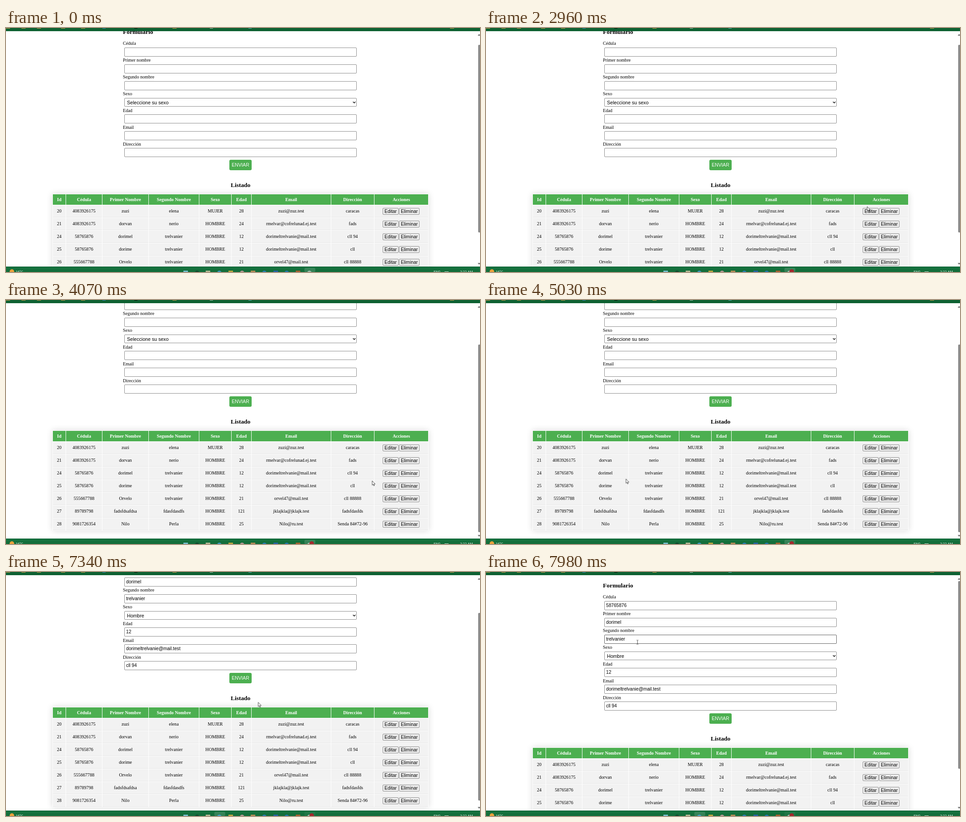
An HTML page for the animation above (8 s loop, 1042 by 537 pixels).

```html
<!DOCTYPE html>
<html lang="es">
<head>
<meta charset="utf-8">
<title>Formulario</title>
<style>
@property --scroll { syntax: "<number>"; inherits: true; initial-value: 21; }
html, body { margin: 0; width: 100%; height: 100%; overflow: hidden; background: #fff; }
#stage {
  position: absolute; inset: 0; overflow: hidden; color: #000;
  font: 10.15px/12px "Liberation Serif", "Times New Roman", serif;
  animation: scroll 8s step-end infinite;
}
#stage * { position: absolute; box-sizing: border-box; white-space: nowrap; }
#view { left: 0; top: 7px; width: 1037px; height: 518px; overflow: hidden; }
#page { left: 0; top: -7px; width: 1037px; height: 640px; transform: translateY(calc(var(--scroll) * -1px)); }
h3 { margin: 0; font-size: 13.45px; line-height: 16px; }
.field, .btn, #send { font-family: "Liberation Sans", Arial, sans-serif; }
.field { left: 260px; width: 511px; height: 20px; border: 1px solid #8e8e8e; border-radius: 2px; background: #fff; }
.field span { left: 3px; top: 3px; }
.select { height: 19px; font-size: 10.6px; }
.select span { left: 5px; }
.select svg { right: 1px; top: 6px; width: 7px; height: 6px; }
.filled { animation: filled 8s step-end infinite; }
.empty { animation: empty 8s step-end infinite; }
#send { left: 491px; top: 311px; width: 49px; height: 23px; border-radius: 3px; background: #4caf50; color: #fff; font-size: 10.3px; line-height: 23px; text-align: center; }
#table { left: 102px; top: 386px; width: 827px; height: 221px; background: #fff; box-shadow: 0 0 13px rgba(0,0,0,.15); }
.cell { height: 27px; line-height: 26px; text-align: center; background: #f2f2f2; border-bottom: 1px solid #e6e6e6; }
.head { height: 23px; line-height: 23px; background: #4caf50; color: #fff; font-weight: bold; border: 0; }
.btn { top: 6px; height: 15px; border: 1px solid #8e8e8e; border-radius: 2px; background: #efefef; font-size: 10.3px; line-height: 13px; }
.hover { animation: hover 8s step-end infinite; }
.hovered { animation: border 8s step-end infinite; }
#thumb { left: 1038px; top: calc(20px + var(--scroll) * .79px); width: 5px; height: 413px; border-radius: 2px; background: #8b8b8b; }
.arrow { left: 1037px; border: 3px solid transparent; }
.bar { left: 0; width: 100%; overflow: hidden; background: #0e6132; }
#top { top: 0; height: 7px; }
#bottom { top: 525px; height: 12px; background: linear-gradient(#0b5c30 0, #16733f 2px, #126b39); color: #fff; font: 7.5px/9px "Open Sans", sans-serif; }
#bottom span { top: 7px; }
.dot { border-radius: 50%; }
.lit { left: 458px; top: 3px; width: 24px; height: 9px; border-radius: 3px; background: rgba(255,255,255,.14); animation: active 8s step-end infinite; }
.lit.first { left: 656px; animation-name: first; }
#record { left: 667px; top: 6px; width: 10px; height: 10px; background: #a3262c; animation: record 8s step-end infinite; }
#cursor { left: 0; top: 0; animation: move 8s linear infinite; }
#cursor svg { overflow: visible; width: 8px; height: 13px; }
#pointer { animation: pointer 8s step-end infinite; }
#ibeam { animation: ibeam 8s step-end infinite; }

@keyframes scroll {
  0% { --scroll: 21; }
  37.9% { --scroll: 38; }
  38.75% { --scroll: 75; }
  39.6% { --scroll: 97; }
  40.5% { --scroll: 99; }
  91.7% { --scroll: 89; }
  92.6% { --scroll: 58; }
  93.5% { --scroll: 27; }
  94.4% { --scroll: 14; }
  95.3% { --scroll: 4; }
  96.1%, 100% { --scroll: 0; }
}
@keyframes filled { 0% { opacity: 0; } 85.6%, 100% { opacity: 1; } }
@keyframes empty { 0% { opacity: 1; } 85.6%, 100% { opacity: 0; } }
@keyframes hover { 0% { background: #efefef; } 82% { background: #e5e5e5; } 87%, 100% { background: #efefef; } }
@keyframes border { 0% { border-color: #8e8e8e; } 97%, 100% { border-color: #636363; } }
@keyframes active { 0% { opacity: 0; } 80%, 100% { opacity: 1; } }
@keyframes first { 0% { opacity: 1; } 80%, 100% { opacity: .35; } }
@keyframes record { 0% { opacity: 0; } 6%, 100% { opacity: 1; } }
@keyframes pointer { 0% { opacity: 1; } 95.3%, 100% { opacity: 0; } }
@keyframes ibeam { 0% { opacity: 0; } 95.3%, 100% { opacity: 1; } }
@keyframes move {
  0%, .8% { transform: translate(667px, 545px); }
  3.5% { transform: translate(770px, 420px); }
  6% { transform: translate(839px, 335px); }
  8.5% { transform: translate(812px, 303px); }
  10.2%, 12% { transform: translate(796px, 321px); }
  16.4%, 19.7% { transform: translate(791px, 303px); }
  23% { transform: translate(755px, 289px); }
  26.5% { transform: translate(645px, 302px); }
  29.4% { transform: translate(592px, 330px); }
  32.5% { transform: translate(660px, 352px); }
  35.2% { transform: translate(768px, 374px); }
  36.1% { transform: translate(829px, 387px); }
  37% { transform: translate(838px, 393px); }
  39.6%, 40.5% { transform: translate(836px, 392px); }
  47.4%, 50.9% { transform: translate(805px, 398px); }
  55% { transform: translate(600px, 385px); }
  60.4% { transform: translate(345px, 393px); }
  64% { transform: translate(291px, 394px); }
  70.5% { transform: translate(520px, 390px); }
  75.5% { transform: translate(711px, 392px); }
  79% { transform: translate(848px, 389px); }
  81% { transform: translate(853px, 388px); }
  83%, 86% { transform: translate(848px, 383px); }
  89% { transform: translate(700px, 330px); }
  91.75% { transform: translate(555px, 287px); }
  93.5% { transform: translate(470px, 235px); }
  96.1% { transform: translate(350px, 163px); }
  98%, 100% { transform: translate(333px, 154px); }
}
</style>
</head>
<body>
<div id="stage">
  <div id="view"><div id="page">
    <h3 style="left:257px;top:22px">Formulario</h3>
    <div id="send">ENVIAR</div>
    <h3 style="left:494px;top:359px">Listado</h3>
    <div id="table"></div>
  </div></div>
  <div id="thumb"></div>
  <div class="arrow" style="top:10px;border-bottom:4px solid #777"></div>
  <div class="arrow" style="top:517px;border-top:4px solid #777"></div>
  <div id="top" class="bar"></div>
  <div id="bottom" class="bar">
    <div class="lit first"></div><div class="lit"></div>
    <span style="left:21px">16°C</span>
    <span style="left:940px">ENG</span>
    <span style="left:998px">2:22 AM</span>
    <div id="record" class="dot"></div>
  </div>
  <div id="cursor">
    <svg id="pointer"><path d="M0 0V9.5L2.2 7.5L3.7 11L5 10.4L3.6 7.1H6.6Z" fill="#fff" stroke="#222" stroke-width=".8"/></svg>
    <svg id="ibeam"><path d="M-2 -4H-.5M.5 -4H2M0 -3.7V4.7M-2 5H-.5M.5 5H2" fill="none" stroke="#333" stroke-width=".9"/></svg>
  </div>
</div>
<script>
const $ = id => document.getElementById(id);

function add(parent, className, style, text = "") {
  const el = document.createElement("div");
  el.className = className;
  for (const [key, value] of Object.entries(style))
    el.style[key] = typeof value === "number" && key !== "opacity" ? value + "px" : value;
  el.textContent = text;
  parent.append(el);
  return el;
}

function addText(parent, className, text) {
  const span = document.createElement("span");
  span.className = className;
  span.textContent = text;
  parent.append(span);
}

const person = ["58765876", "dorimel", "trelvanier", "Hombre", "12", "dorimeltrelvanie@mail.test", "cll 94"];
const labels = ["Cédula", "Primer nombre", "Segundo nombre", "Sexo", "Edad", "Email", "Dirección"];
labels.forEach((label, i) => {
  const select = i === 3;
  const top = Math.round(63.7 + 36.9 * i) + (select ? 1 : 0);
  add($("page"), "", { left: 257, top: Math.round(49.2 + 36.9 * i) }, label);
  const field = add($("page"), "field" + (select ? " select" : i === 2 ? " hovered" : ""), { top });
  if (select) {
    addText(field, "empty", "Seleccione su sexo");
    field.insertAdjacentHTML("beforeend",
      '<svg viewBox="0 0 7 6"><path d="M.8 1.2L3.5 4L6.2 1.2" fill="none" stroke="#111" stroke-width="1.4"/></svg>');
  }
  addText(field, "filled", person[i]);
});

const edges = [102.5, 131.5, 211.5, 313.5, 424.5, 495.5, 539.5, 714.5, 809.5, 928.5];
const heads = ["Id", "Cédula", "Primer Nombre", "Segundo Nombre", "Sexo", "Edad", "Email", "Dirección", "Acciones"];
const rows = [
  ["20", "4083926175", "zuzi", "elena", "MUJER", "28", "zuzi@zuz.test", "caracas"],
  ["21", "4083926175", "dorvan", "nerio", "HOMBRE", "24", "rmelvar@cofrelunad.ej.test", "fads"],
  ["24", "58765876", "dorimel", "trelvanier", "HOMBRE", "12", person[5], "cll 94"],
  ["25", "58765876", "dorime", "trelvanier", "HOMBRE", "12", person[5], "cll"],
  ["26", "555667788", "Orvelo", "trelvanier", "HOMBRE", "21", "orvel47@mail.test", "cll 88888"],
  ["27", "89789798", "fadsfdsafdsa", "fdasfdasdfs", "HOMBRE", "121", "jklajkla@jklajk.test", "fadsfdasfds"],
  ["28", "9081726354", "Nilo", "Perla", "HOMBRE", "25", "Nilo@ru.test", "Senda 84#72-96"]
];

function addCell(className, column, top, text) {
  const left = edges[column] + .5;
  return add($("page"), className, { left, top, width: edges[column + 1] - .5 - left }, text);
}

heads.forEach((text, column) => addCell("cell head", column, 387, text));
rows.forEach((row, i) => {
  const top = 411 + 28 * i;
  row.forEach((text, column) => addCell("cell", column, top, text));
  const actions = addCell("cell", 8, top, "");
  add(actions, "btn" + (i === 2 ? " hover" : ""), { left: 18, width: 35 }, "Editar");
  add(actions, "btn", { left: 54, width: 45 }, "Eliminar");
});

// Clipped tab icons and taskbar icons, as plain shapes.
for (const x of [4, 38, 72, 125, 169, 370, 980])
  add($("top"), "", { left: x - 4, top: 0, width: 9, height: 1, background: "#d8a04c" });
for (const [x, color] of [[215, "#3a86c8"], [285, "#000"], [451, "#a9c4b2"], [536, "#55b8c0"]])
  add($("top"), "", { left: x - 3, top: 0, width: 7, height: 1, background: color });

const icons = ["#8ed0ee", "#123f2c", "#d9c9a8", "#4aa3df", "#e3b341", "#d9a0a8", "#d9925c", "#2f7fd0", "#2d62c0", "#2878c8", "#c9602f", "#b9c9c0"];
icons.forEach((color, i) =>
  add($("bottom"), i % 2 ? "dot" : "", { left: 390 + 24.7 * i, top: 9, width: 10, height: 10, background: color, opacity: .8 }));
add($("bottom"), "dot", { left: 8, top: 6, width: 10, height: 10, background: "#e8a13c" });
add($("bottom"), "", { left: 964, top: 11, width: 9, height: 1, background: "#cfe0d5" });
$("bottom").append($("record"));
</script>
</body>
</html>
```
